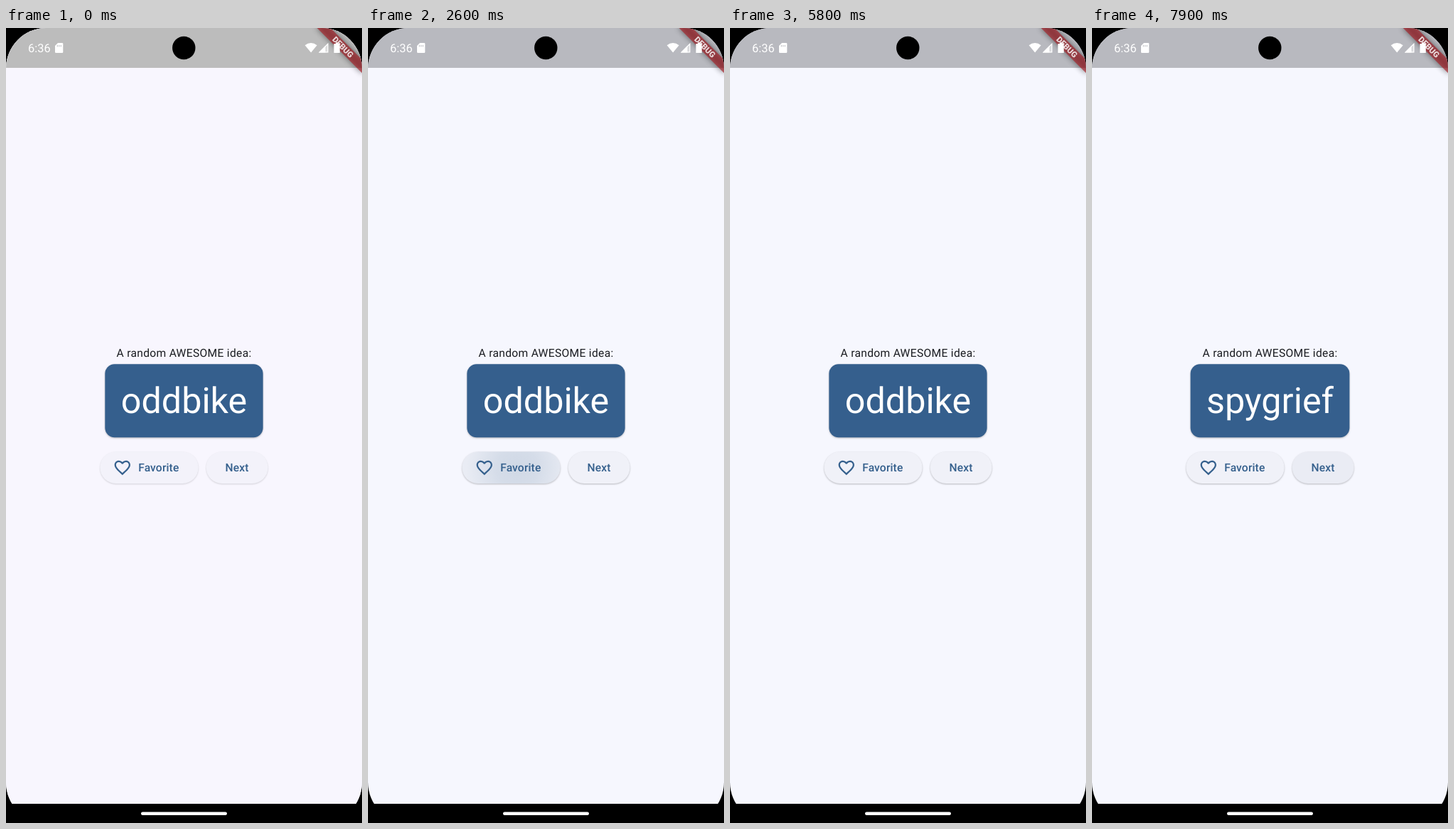
An HTML page that plays this animation: 501 by 1117 pixels, repeating every 8000 ms.

```html
<!DOCTYPE html>
<html lang="en">
<head>
<meta charset="utf-8">
<title>Word idea generator</title>
<style>
  html, body { margin: 0; width: 100%; height: 100%; overflow: hidden; background: #000; }
  svg { display: block; width: 501px; height: 1117px; }
  text { font-family: Roboto, sans-serif; text-rendering: geometricPrecision; }
  .center { text-anchor: middle; }
  .label { font-size: 15.66px; font-weight: 500; letter-spacing: .11px; fill: #35608d; }
  .caption { font-size: 15.66px; letter-spacing: .28px; fill: #1a1c20; }
  .word { font-size: 50.32px; fill: #fff; }
  .raised { filter: drop-shadow(0 1px 1px rgba(0, 0, 0, .25)); }
  .debug { font-size: 11.4px; font-weight: 900; fill: #fff; fill-opacity: .82; }
</style>
</head>
<body>
<svg viewBox="0 0 501 1117">
  <defs>
    <radialGradient id="ink">
      <stop offset="0" stop-color="#36618e"/>
      <stop offset=".4" stop-color="#36618e" stop-opacity=".8"/>
      <stop offset="1" stop-color="#36618e" stop-opacity="0"/>
    </radialGradient>
    <clipPath id="display"><rect width="501" height="1117" rx="57"/></clipPath>
    <clipPath id="favoriteClip"><rect id="favoriteShape" x="132.5" y="595.3" width="138.1" height="44.7" rx="22.4"/></clipPath>
    <clipPath id="nextClip"><rect id="nextShape" x="281.8" y="595.3" width="86.7" height="44.7" rx="22.4"/></clipPath>
    <filter id="soft" x="-30%" y="-150%" width="160%" height="400%"><feGaussianBlur stdDeviation="4"/></filter>
  </defs>
  <rect width="501" height="1117"/>
  <g clip-path="url(#display)">
    <rect width="501" height="1090" fill="#f6f7fe"/>
    <rect width="501" height="56" fill="#b8b9bf"/>
    <g id="intro">
      <rect width="501" height="1090" fill="#f8f6fe"/>
      <rect width="501" height="56" fill="#bcbcbc"/>
    </g>
    <g transform="translate(501 0) rotate(45)">
      <rect x="-44.7" y="31.3" width="89.4" height="13.4" filter="url(#soft)" opacity=".5"/>
      <rect x="-44.7" y="31.3" width="89.4" height="13.4" fill="#a81c24" fill-opacity=".63"/>
      <text class="center debug" y="42">DEBUG</text>
    </g>
    <g fill="#fff">
      <text x="31" y="34" font-size="16.4">6:36</text>
      <path d="M73 21h6q1.3 0 1.3 1.3v11.5q0 1.3-1.3 1.3h-8.700q-1.300 0-1.300-1.300V25z"/>
      <path d="M72.300 24v2.400M74.800 24v2.400M77.300 24v2.400" stroke="#b8b9bf"/>
      <path d="M420.700 24.300Q429.200 17.800 437.700 24.300L429.200 34.600z"/>
      <path d="M453.500 21v13.500H440z" fill-opacity=".45"/>
      <path d="M449.500 25v9.500H440z"/>
      <path d="M452.800 22.500v11.300H441.500z" fill="none" stroke="#fff" stroke-width="1.200"/>
      <path d="M464 20.300h3.500v1.700h2.300v13h-8.300v-13h2.500z"/>
    </g>
  </g>
  <circle cx="250.300" cy="28" r="16.200"/>
  <rect x="190" y="1101.500" width="121" height="4.500" rx="2.250" fill="#fff"/>

  <text class="center caption" x="250.500" y="462">A random AWESOME idea:</text>
  <rect id="card" class="raised" y="472.300" height="102.900" rx="13.400" fill="#355f8d"/>
  <text id="word" class="center word" x="250.500" y="540.950"></text>

  <g id="backs" class="raised" fill="#f0f1f8">
    <use href="#favoriteShape"/>
    <use href="#nextShape"/>
  </g>
  <g id="favorite" clip-path="url(#favoriteClip)">
    <use href="#favoriteShape" fill="#36618e"/>
    <circle fill="url(#ink)"/>
  </g>
  <g id="next" clip-path="url(#nextClip)">
    <use href="#nextShape" fill="#36618e"/>
    <circle fill="url(#ink)"/>
  </g>
  <g transform="translate(150.400 604.300) scale(1.118)" fill="#35608d" fill-rule="evenodd">
    <path id="heart"/>
  </g>
  <text class="label" x="186.200" y="623">Favorite</text>
  <text class="label" x="308.600" y="623">Next</text>
</svg>
<script>
const $ = id => document.getElementById(id);
const LOOP = 8000, STEP = 100;
const LIKE = 2600, UNLIKE = 4200, NEXT = [6300, 7300];
const WORDS = ['oddbike', 'warmact', 'spygrief'];
const CARD_PADDING = 44.7, REST = .035;

const HEART = 'M16.5 3c-1.74 0-3.41.81-4.5 2.09C10.91 3.81 9.24 3 7.5 3 4.42 3 2 5.42 2 8.5c0 3.78 3.4 6.86 8.55 11.54L12 21.35l1.45-1.32C18.6 15.36 22 12.28 22 8.5 22 5.42 19.58 3 16.5 3z';
const HOLE = 'M12.1 18.55l-.1.1-.1-.1C7.14 14.24 4 11.39 4 8.5 4 6.5 5.5 5 7.5 5c1.54 0 3.04.99 3.57 2.36h1.87C13.46 5.99 14.96 5 16.5 5c2 0 3.5 1.5 3.5 3.5 0 2.89-3.14 5.74-7.9 10.05z';

const progress = (t, from, length) => Math.min(1, Math.max(0, (t - from) / length));
const easeOut = k => 1 - (1 - k) ** 2;

function setAttrs(el, attrs) {
  for (const key in attrs) el.setAttribute(key, attrs[key]);
}

function drawInk(id, wash, splash) {
  const [shape, circle] = $(id).children;
  setAttrs(shape, { opacity: wash });
  setAttrs(circle, splash);
}

// A quick tap: a wide splash for one step, then a wash that settles to a faint tint.
function quickTap(t, at, x, y) {
  const age = t - at;
  const wash = age < 0 ? 0 : age < STEP ? .04 : REST + .085 * (1 - easeOut(progress(age, STEP, 500)));
  const opacity = age >= 0 && age < STEP ? .14 : 0;
  return [wash, { cx: x, cy: y, r: 72, opacity }];
}

// A slow press: a small spot grows under the finger, then fades with the tint.
function slowPress(t, at, x, y) {
  const grow = progress(t, at, 800), fade = 1 - progress(t, at + 800, 600);
  return [REST * fade, { cx: x, cy: y, r: 8 + 14 * grow, opacity: (.035 + .125 * grow) * fade }];
}

function render(t) {
  const settled = progress(t, 0, 900);
  setAttrs($('intro'), { opacity: 1 - settled });
  setAttrs($('backs'), { opacity: .6 + .4 * settled });

  const word = WORDS[NEXT.filter(at => t > at).length];
  if ($('word').textContent !== word) $('word').textContent = word;
  const width = $('word').getComputedTextLength() + CARD_PADDING;
  setAttrs($('card'), { x: 250.5 - width / 2, width });

  const liked = t > LIKE && t <= UNLIKE + STEP;
  setAttrs($('heart'), { d: liked ? HEART : HEART + HOLE });

  const press = t < UNLIKE ? quickTap(t, LIKE, 210, 618) : slowPress(t, UNLIKE, 223, 627);
  drawInk('favorite', ...press);
  drawInk('next', ...quickTap(t, t < NEXT[1] ? NEXT[0] : NEXT[1], 325, 622));
}

const start = performance.now();
function tick(now) {
  const t = Math.max(0, now - start) % LOOP;
  render(Math.floor(t / STEP) * STEP);
  requestAnimationFrame(tick);
}
render(0);
requestAnimationFrame(tick);
</script>
</body>
</html>
```
